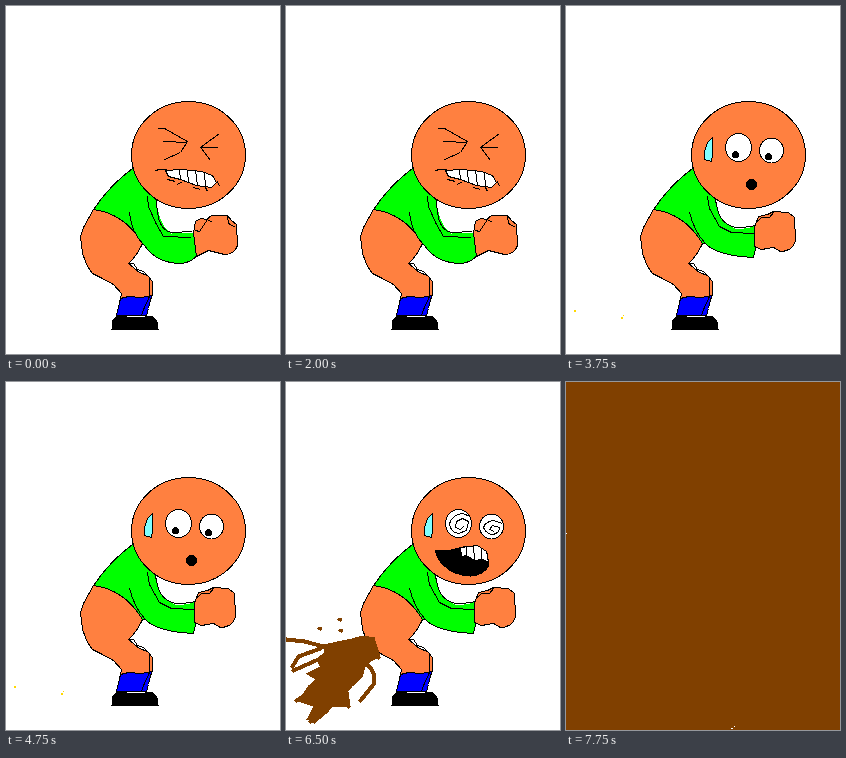
An HTML page for the animation above (9.75 s loop, 274 by 348 pixels).

```html
<!DOCTYPE html>
<html lang="en">
<head>
<meta charset="utf-8">
<title>Strain</title>
<style>
  html, body { margin: 0; width: 100%; height: 100%; overflow: hidden; background: #fff; }
  svg { display: block; width: 274px; height: 348px; shape-rendering: crispEdges; }
  [data-part] { display: none; }
  [data-part].on { display: inline; }
  .line { fill: none; stroke: #000; }
  .skin, .shirt, .white, .sock, .sweat { stroke: #000; }
  .skin { fill: #ff8040; }
  .shirt, .sleeve { fill: #0f0; }
  .white { fill: #fff; }
  .sock { fill: #00f; }
  .sweat { fill: #80ffff; }
  .mud { fill: #804000; }
  .smear { fill: none; stroke: #804000; stroke-width: 4; stroke-linecap: round; stroke-linejoin: round; }
  .drop { fill: #ffd800; }
</style>
</head>
<body>
<svg viewBox="0 0 274 348">
  <g transform="translate(.5 .5)">
    <g id="man">
      <g data-part="crouch">
        <path class="skin" d="M87 203L77 221L74 230L76 247L81 260L86 267L94 271L107 278L115 287L114 292H145L146 288V275L141 269L133 266L122 257Q130 250 136 237Q126 207 87 203Z"/>
        <path class="line" d="M122 257L127 257L131 263L137 265L143 271L143 291"/>
        <path class="sock" d="M114 292L122 290L135 291L145 289L142 302L140 309H110Z"/>
        <path class="line" d="M143 290L137 303L135 309"/>
        <path d="M105 323L106 313L111 309L130 311L146 309L151 315L152 323Z"/>
      </g>
      <g data-part="stand">
        <path class="skin" d="M87 203L77 221L74 232Q74 243 83 250Q96 260 96 278V330H127L132 300L133 254L136 242Q126 207 87 203Z"/>
        <path class="line" d="M126 252Q122 276 125 290L127 330"/>
        <path class="sock" d="M92 330L105 333L115 329H128L126 345L122 352H95Z"/>
        <path d="M92 345L106 352L118 347L129 349L130 368L119 369L116 376L92 377Z"/>
      </g>
      <path class="shirt" d="M126 162Q104 178 87 203Q118 207 136 237L158 236L152 214L148 185Z"/>

      <g data-part="armsA">
        <path class="sleeve" d="M123 206Q126 230 138 239Q150 257 175 257Q187 255 190 249L187 226L165 227Q153 221 149 190Z"/>
        <path class="line" d="M123 206Q125 227 138 239Q150 257 175 257Q187 255 190 249L187 226M141 190L142 200L150 218L157 230L185 231M149 190L152 212Q156 225 165 226L186 225"/>
        <path class="skin" d="M187 226L189 215L194 212L200 213L205 209L221 209L225 214L230 218L231 239Q228 248 218 248L202 244L190 250Z"/>
        <path class="line" d="M189 224L193 225L201 213L206 216M221 210L222 217L229 221"/>
      </g>
      <g data-part="armsB">
        <path class="sleeve" d="M123 207Q127 229 139 238Q151 255 174 256Q187 255 189 248L188 224L166 225Q153 219 149 190Z"/>
        <path class="line" d="M123 207Q127 229 139 238Q151 255 174 256Q187 255 189 248L188 224M141 190L143 200L151 217L159 229L186 229M149 190L152 211Q157 225 166 224L187 224"/>
        <path class="skin" d="M188 224L190 214L195 211L201 212L206 208L221 208L227 214L231 218L230 238Q227 247 217 246L203 243L189 248Z"/>
        <path class="line" d="M190 222L194 223L202 212L207 215M221 209L223 216L229 220"/>
      </g>
      <g data-part="armsC">
        <path class="sleeve" d="M123 206Q128 225 138 236Q148 249 187 251L189 243V219Q181 223 169 222Q155 218 151 203L148 189Z"/>
        <path class="line" d="M123 206Q128 225 138 236Q148 249 187 251L189 243V219Q181 221 169 221Q155 218 151 203L148 189M141 190L143 202L153 220L165 226L188 227"/>
        <path class="skin" d="M188 221L192 210L201 208L207 205L222 206L228 211L229 234Q226 245 214 245L207 241L195 243L188 240Z"/>
        <path class="line" d="M190 216L195 211L203 211L207 206"/>
      </g>

      <ellipse class="skin" cx="182" cy="148.5" rx="57" ry="53.5"/>

      <g data-part="strainA">
        <path class="line" d="M151 122H158L181 135L174 146L158 153M157 135L181 136M213 127L194 141H211M195 142L204 154M149 164L153 163H160"/>
        <path class="white" d="M159 164L175 163L195 165L206 169L210 176L205 181L190 179L174 173L162 170Z"/>
        <path class="line" d="M173 163L174 173M181 164L182 177M189 164L191 179M198 166L199 180M161 173L169 175M171 178L176 175M187 181L194 183M199 181L201 185M211 175L213 180"/>
      </g>
      <g data-part="strainB">
        <path class="line" d="M152 124L159 124L182 136L175 148L160 154M156 137L182 137M213 129L194 142H212M195 143L206 156M150 166L154 164H161"/>
        <path class="white" d="M160 165L176 164L195 166L207 170L211 177L206 183L190 181L174 175L162 171Z"/>
        <path class="line" d="M174 164L175 175M182 165L183 179M190 165L191 181M199 167L200 182M162 175L170 177M172 180L177 177M188 183L195 185"/>
      </g>

      <path data-part="sweat" class="sweat" d="M146 131L141 136L138 145V153L145 155L146 148Z"/>
      <g data-part="eyes">
        <ellipse class="white" cx="172" cy="141" rx="13" ry="14"/>
        <ellipse class="white" cx="205" cy="144" rx="12" ry="12.5"/>
      </g>
      <g data-part="down"><circle cx="169" cy="148" r="3.5"/><circle cx="202" cy="150" r="3.5"/></g>
      <g data-part="gasp">
        <path class="line" d="M162 116Q171 106 181 113M199 117Q207 111 215 120"/>
        <circle cx="172" cy="141" r="3"/><circle cx="205" cy="144" r="3"/>
      </g>
      <circle data-part="oh" cx="185" cy="178" r="5.5"/>
      <g data-part="relief">
        <path class="skin" d="M159 141A13 14 0 0 1 185 141ZM193 144A12 12.5 0 0 1 217 144Z"/>
        <path class="line" d="M157 173L160 176Q166 179 171 183Q184 189 204 184L209 178"/>
      </g>
      <g data-part="inward"><circle cx="180" cy="143" r="3.5"/><circle cx="200" cy="146" r="3.5"/></g>
      <g data-part="outward"><circle cx="170" cy="145" r="3.5"/><circle cx="203" cy="148" r="3.5"/></g>
      <g data-part="dizzy">
        <path class="line" d="M184 134L176 131Q166 132 163 141Q164 150 172 151L180 148L182 139L176 136L170 139L169 145L174 147L177 144M216 141L207 138Q199 139 197 145Q200 152 207 152Q213 150 213 145L206 143L203 147L208 149"/>
        <path d="M148 167L160 168L176 164L191 163L201 170L203 183Q198 193 184 194Q166 193 158 184Q150 178 148 167Z"/>
        <path class="white" d="M174 165L191 163L200 169L202 180L196 177L188 178L180 173L175 174Z"/>
        <path class="line" d="M180 164V173M187 163L188 178M195 166V177"/>
      </g>
    </g>

    <g id="drops"></g>
    <path data-part="lump" id="lump" class="mud" d="M0 16V9L7 7L9 2L14 0L19 1L20 7L24 10L26 16Z"/>

    <g data-part="splat">
      <path class="mud" d="M36 263L58 258L76 253L88 255L94 274L84 279L79 284L76 295L66 304L62 309L64 324L45 325L39 332L28 341L20 337L27 324L11 319L22 303L29 297L19 291L33 284L30 276L38 270Z"/>
      <path class="smear" d="M0 257L18 259L37 264L75 256M6 284L12 274L34 266M7 288L34 276M10 318L34 304M78 280Q91 289 87 302L74 318M57 304L62 324M90 272L92 275M24 339L40 329"/>
      <path class="smear" d="M33 246h1M53 237h1M54 248h1"/>
    </g>
    <g data-part="burst">
      <path class="smear" stroke-width="5" d="M0 238Q35 214 88 257M0 274L72 262M0 305L75 273M14 348L82 278M88 279Q118 295 108 340"/>
      <path class="mud" d="M0 272L70 255L94 260L95 278L84 302L79 348H0Z"/>
    </g>
    <g data-part="surge">
      <path class="mud" d="M0 207L96 205L116 213L121 260L118 348H0Z"/>
      <path class="smear" d="M0 210Q57 164 118 207M119 242Q155 277 132 348"/>
    </g>
    <g data-part="flood">
      <path class="mud" d="M0 151L8 146L45 145L68 141L108 145L128 139L152 141L160 154L158 170L166 182L163 230L160 290L158 348H0Z"/>
      <path class="smear" d="M0 146C30 112 95 108 158 141M47 143Q74 130 108 141M169 216L184 236Q195 262 191 278Q174 294 174 318L176 348M160 294L184 299Q213 311 222 348"/>
      <path class="smear" d="M112 68h0M220 304h0M183 319l1 3M198 331l2 2M208 345l2 2M16 83l2 2M67 96h1M97 86l2 1"/>
      <path fill="none" stroke="#804000" d="M154 151q13-4 20 4M158 160q12-6 16 7M164 169q9-3 14 8M161 153l10 14"/>
      <path fill="none" stroke="#ff8040" stroke-width="2" d="M85 260L89 264L91 270M105 323L108 332"/>
      <path id="spray" class="mud"/>
    </g>
    <path data-part="swamp" class="mud" d="M-1 57L40 36L92 42L143 20L198 51L228 104L240 180L251 348H-1Z"/>
    <g data-part="full">
      <path class="mud" d="M-1-1H275V349H-1Z"/>
      <path fill="#fff" d="M-.5 150.5h1v1h-1zM164.5 345.5h2v1h-2zM167.5 343.5h1v1h-1z"/>
    </g>
  </g>
</svg>
<script>
const STEP = 250, LOOP = 9750, LAST = 31;
const $ = id => document.getElementById(id);
const parts = [...document.querySelectorAll('[data-part]')];

let seed = 17;
const rnd = () => (seed = seed * 16807 % 2147483647) / 2147483647;
const speck = (x, y) => `M${Math.round(x) - .5} ${Math.round(y) - .5}h1v1h-1z`;

// Grainy spray above and beside the flood
function spray() {
  let d = '';
  for (let i = 0; i < 1300; i++) {
    const x = rnd() * 158;
    const arc = 146 - 27 * Math.sin(Math.PI * x / 158);
    d += speck(x, arc + 26 * rnd());
  }
  for (let i = 0; i < 900; i++) {
    const u = rnd();
    const ridge = 78 + 58 * u ** 3 - 5 * Math.cos(u * 13);
    d += speck(u * 152, ridge + 10 * (rnd() + rnd() - 1));
  }
  for (let i = 0; i < 650; i++) {
    const u = rnd();
    d += speck(u * 110, 90 + (38 - 14 * u) * rnd());
  }
  for (let i = 0; i < 2400; i++) d += speck(157 + 17 * rnd() ** 1.4, 144 + rnd() * 204);
  return d;
}
$('spray').setAttribute('d', spray());

// Thin arc from the seat to the ground, p in 0..1
function dropArc(p) {
  return [[8, 304], [55, 311], [57, 309]].map(([x, y], k) => {
    const s = k < 2 ? 2 : 1;
    const px = Math.round(80 + (x - 80) * p), py = Math.round(261 + (y - 261) * p * p);
    return `<rect class="drop" x="${px - .5}" y="${py - .5}" width="${s}" height="${s}"/>`;
  }).join('');
}

const dropAt = { 13: .2, 14: .6, 15: 1, 16: .1, 17: .4, 18: .7, 19: 1 };
const lumpAt = { 21: [66, 262], 22: [52, 285] };

function pose(n) {
  if (n === LAST) return 'full';
  if (n < 12) return 'crouch ' + (n % 2 ? 'armsB strainB' : 'armsA strainA');
  const base = 'crouch armsC sweat eyes ';
  if (n === 12) return base + 'gasp oh';
  if (n < 21) return base + 'down oh';
  if (n < 23) return base + 'down oh lump';
  if (n < 25) return base + 'lump relief ' + (n === 23 ? 'inward' : 'outward');
  if (n === 25) return base + 'lump down oh';
  if (n < 29) return base + 'dizzy ' + ['splat', 'splat burst', 'surge'][n - 26];
  return 'stand armsC sweat eyes dizzy flood' + (n === 30 ? ' swamp' : '');
}

let shown = -1;
function show(n) {
  if (n === shown) return;
  shown = n;
  const on = pose(n).split(' ');
  parts.forEach(p => p.classList.toggle('on', on.includes(p.dataset.part)));
  const lift = n < 28 ? 0 : n === 28 ? .5 : 1;
  $('man').setAttribute('transform', `translate(${80 * lift} ${-94 * lift})`);
  $('man').style.display = n === LAST ? 'none' : '';
  $('drops').innerHTML = n in dropAt ? dropArc(dropAt[n]) : '';
  $('lump').setAttribute('transform', `translate(${lumpAt[n] || [40, 309]})`);
}

const start = performance.now();
function tick() {
  const t = (performance.now() - start) % LOOP;
  show(Math.min(LAST, Math.floor(t / STEP)));
  requestAnimationFrame(tick);
}
tick();
</script>
</body>
</html>
```
